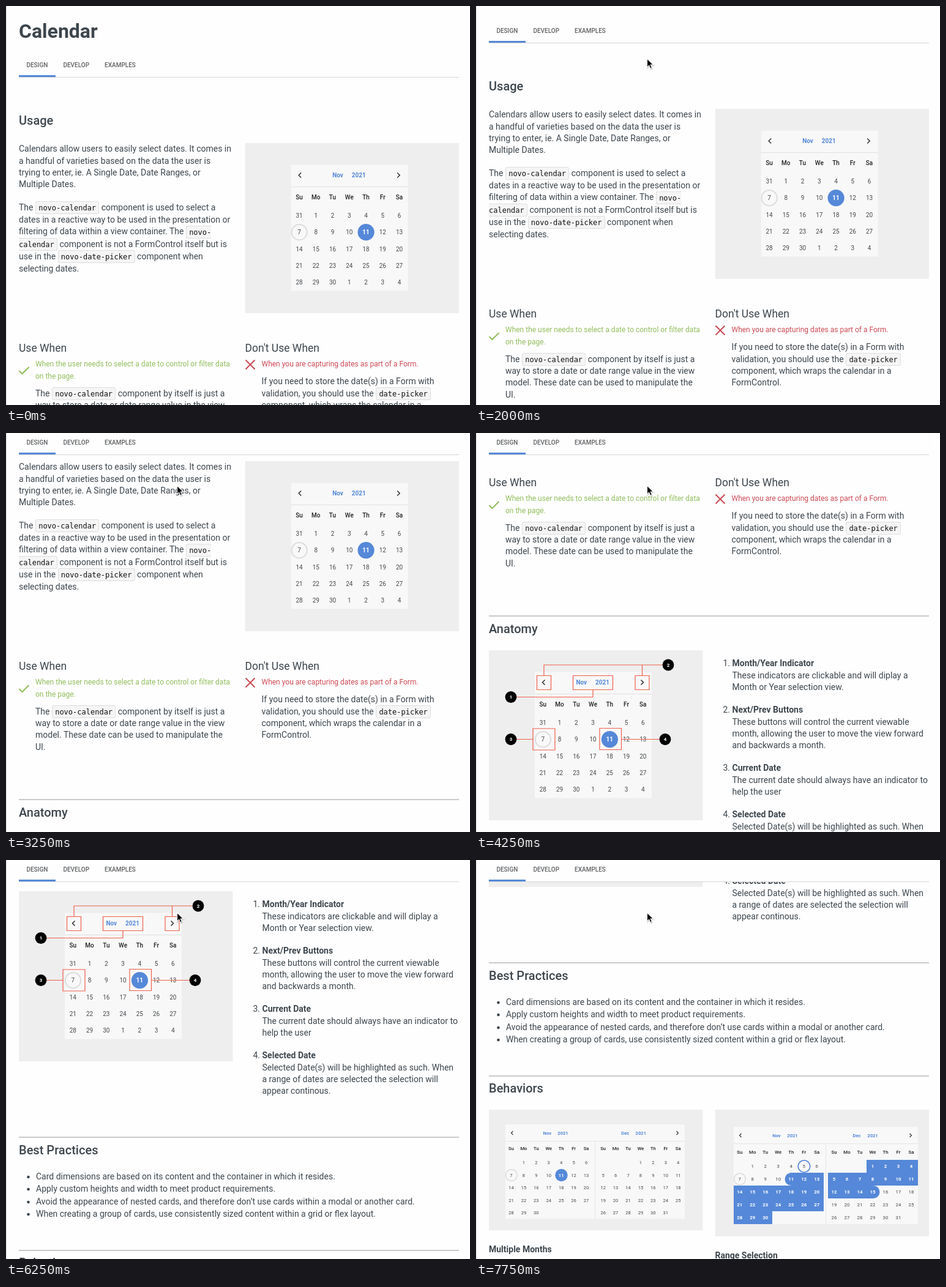
Recreate the animation shown at these times as an HTML page. Size 758x652 px, loop 8 s.

```html
<!DOCTYPE html>
<html lang="en">
<head>
<meta charset="utf-8">
<title>Calendar</title>
<style>
@property --s { syntax: "<number>"; inherits: true; initial-value: 0; }
:root { --ink: #3d464d; --blue: #5588d8; --green: #92bd5c; --red: #cc4a54; }
html, body { margin: 0; width: 100%; height: 100%; overflow: hidden; background: #fefefe; }
body { font: 14px/20px Roboto, Arial, sans-serif; color: var(--ink); }
#stage {
  position: absolute; left: 0; top: 0; width: 758px; height: 652px; overflow: hidden;
  animation: scroll 8s step-end infinite;
}
#page { position: absolute; inset: 0; transform: translateY(calc(var(--s) * -1px)); }
#tabs {
  position: absolute; left: 21px; top: 81px; width: 719px; height: 35px;
  background: #fefefe; border-bottom: 1px solid #d6d6d8;
  transform: translateY(max(-81px, var(--s) * -1px));
}
#tabs b { position: absolute; top: 6px; font: 500 10px/20px Roboto, sans-serif; color: #5f6164; }
#tabs i { position: absolute; left: 0; top: 32px; width: 60px; height: 3px; background: var(--blue); }
#edge { position: absolute; left: 0; top: 0; width: 1px; height: 652px; background: #d9d9d9; }
#page div { position: absolute; white-space: pre; }
#page .h1 { font-size: 32px; font-weight: 700; }
#page .h2 { font-size: 20px; font-weight: 500; }
#page .h3 { font-size: 17.5px; }
#page .b { font-weight: 700; }
#page .ok { font-size: 12px; color: var(--green); }
#page .no { font-size: 12px; color: var(--red); }
#page .n { width: 30px; text-align: right; }
#page .hr { left: 21px; width: 719px; height: 2px; background: #cacacb; }
code {
  font: 12px/0 "DejaVu Sans Mono", monospace; color: #111; padding: 2.5px 4.2px;
  background: #f5f5f5; border: 1px solid #dedede; border-radius: 3px;
}
code.l { border-right: 0; padding-right: 0; border-radius: 3px 0 0 3px; }
code.r { border-left: 0; padding-left: 0; border-radius: 0 3px 3px 0; }
svg { position: absolute; left: 0; top: 0; overflow: visible; }
svg text { font-family: Roboto, Arial, sans-serif; text-anchor: middle; }
#cursor { animation: show 8s step-end infinite; }
@keyframes show { 0% { opacity: 0; } 9.375% { opacity: .5; } 12.5%, 100% { opacity: 1; } }
@keyframes scroll {
  0% { --s: 0; }
  21.875% { --s: 14; }
  25% { --s: 56; }
  28.125% { --s: 92; }
  31.25% { --s: 114; }
  34.375% { --s: 126; }
  37.5% { --s: 140; }
  40.625% { --s: 178; }
  43.75% { --s: 262; }
  46.875% { --s: 348; }
  50% { --s: 422; }
  53.125% { --s: 478; }
  56.25% { --s: 560; }
  59.375% { --s: 638; }
  62.5% { --s: 684; }
  65.625% { --s: 700; }
  75% { --s: 718; }
  78.125% { --s: 782; }
  81.25% { --s: 846; }
  84.375% { --s: 892; }
  87.5% { --s: 918; }
  90.625% { --s: 956; }
  93.75% { --s: 1020; }
  96.875%, 100% { --s: 1067; }
}
</style>
</head>
<body>
<div id="stage">
  <div id="page"></div>
  <div id="tabs">
    <b style="left:12.4px">DESIGN</b><b style="left:72.4px">DEVELOP</b><b style="left:140px">EXAMPLES</b><i></i>
  </div>
  <div id="edge"></div>
  <svg id="cursor" width="758" height="652">
    <path d="M279.5 86v14.2l3.2-3.1 2.1 5 2.6-1.1-2.1-4.9h4.5z" transform="translate(.6 1.2)" fill="#0003" stroke="#0002" stroke-width="2"/>
    <path d="M279.5 86v14.2l3.2-3.1 2.1 5 2.6-1.1-2.1-4.9h4.5z" fill="#000" stroke="#fff" stroke-width="1.1"/>
  </svg>
</div>
<script>
const BLUE = '#5588d8', DARK = '#45484c', MARK = '#f0604c';
let html = '', art = '';

// HTML text; y is the middle of the first line
const line = (x, y, text, cls = '') =>
  html += `<div class="${cls}" style="left:${x}px;top:${y - 10}px">${text}</div>`;
const lines = (x, ys, texts, cls) => texts.forEach((t, i) => line(x, ys[i], t, cls));
const rule = y => html += `<div class="hr" style="top:${y}px"></div>`;
const code = (t, cls = '') => `<code class="${cls}">${t}</code>`;

// SVG helpers
const label = (x, y, t, size, fill = DARK, weight = 400) =>
  art += `<text x="${x}" y="${y + size * .355}" font-size="${size}" fill="${fill}" font-weight="${weight}">${t}</text>`;
const rect = (x, y, w, h, fill) => art += `<rect x="${x}" y="${y}" width="${w}" height="${h}" fill="${fill}"/>`;
const path = (d, stroke, width = 1) => art += `<path d="${d}" fill="none" stroke="${stroke}" stroke-width="${width}"/>`;
const disc = (x, y, r, fill, stroke = 'none', width = 2) =>
  art += `<circle cx="${x}" cy="${y}" r="${r}" fill="${fill}" stroke="${stroke}" stroke-width="${width}"/>`;
const chevron = (x, y, d, k) => path(`M${x + d * k / 2} ${y - k}l${-d * k} ${k}l${d * k} ${k}`, '#333', k * .38);

const span = (a, b) => Array.from({ length: b - a + 1 }, (_, i) => a + i);
const blanks = n => Array(n).fill('');

function month(x, y, step, size, cells, lit = []) {
  ['Su', 'Mo', 'Tu', 'We', 'Th', 'Fr', 'Sa'].forEach((d, i) => label(x + i * step, y, d, size, '#222', 500));
  const top = y + step * 1.12;
  cells.forEach((n, i) => {
    const on = lit.includes(i);
    label(x + i % 7 * step, top + Math.floor(i / 7) * step, n, size, on ? '#fff' : DARK, on ? 700 : 400);
  });
}

function single(x, y) {
  rect(x, y, 349.5, 278, '#eeeeee');
  rect(x + 75, y + 35.5, 191, 206, '#f8f8f8');
  rect(x + 75, y + 71, 191, 1, '#e0e0e0');
  chevron(x + 89.5, y + 52.5, 1, 4);
  chevron(x + 250.5, y + 52.5, -1, 4);
  label(x + 151.3, y + 52.5, 'Nov', 10, BLUE, 700);
  label(x + 185.5, y + 52.5, '2021', 10, BLUE, 700);
  disc(x + 88.5, y + 145.7, 12.6, 'none', '#dcdcdc');
  disc(x + 197.4, y + 145.7, 13.6, BLUE);
  month(x + 88.3, y + 88, 27.25, 10, [31, ...span(1, 30), ...span(1, 4)], [11]);
}

function double(x, y, w, h, box, heads, divider) {
  const [bx, by, bw, bh] = box;
  rect(x, y, w, h, '#eeeeee');
  rect(bx, by, bw, bh, '#f8f8f8');
  rect(bx, by + 27.3, bw, .8, '#e0e0e0');
  rect(divider, by + 27.3, .8, bh - 27.3, '#e0e0e0');
  chevron(bx + 11, by + 14, 1, 3);
  chevron(bx + bw - 12, by + 14, -1, 3);
  ['Nov', '2021', 'Dec', '2021'].forEach((t, i) => label(heads[i], by + 14, t, 7.6, BLUE, 700));
}

// Usage
line(21, 41, 'Calendar', 'h1');
line(21, 187, 'Usage', 'h2');
lines(21, [233, 253, 272, 291, 328.5, 349, 368, 388.5, 408.5, 429], [
  'Calendars allow users to easily select dates. It comes in',
  'a handful of varieties based on the data the user is',
  'trying to enter, ie. A Single Date, Date Ranges, or',
  'Multiple Dates.',
  `The ${code('novo-calendar')} component is used to select a`,
  'dates in a reactive way to be used in the presentation or',
  `filtering of data within a view container. The ${code('novo-', 'l')}`,
  `${code('calendar', 'r')} component is not a FormControl itself but is`,
  `use in the ${code('novo-date-picker')} component when`,
  'selecting dates.'
]);
single(390.7, 224);

line(21, 559, 'Use When', 'h3');
lines(48, [585, 605], ['When the user needs to select a date to control or filter data', 'on the page.'], 'ok');
lines(48, [632.5, 652, 671, 691], [
  `The ${code('novo-calendar')} component by itself is just a`,
  'way to store a date or date range value in the view',
  'model. These date can be used to manipulate the',
  'UI.'
]);
path('M21.5 596l5 5L37.5 590', '#92bd5c', 2);
line(390.5, 559, "Don't Use When", 'h3');
line(417.5, 585, 'When you are capturing dates as part of a Form.', 'no');
lines(417.5, [613, 632.5, 652, 671], [
  'If you need to store the date(s) in a Form with',
  `validation, you should use the ${code('date-picker')}`,
  'component, which wraps the calendar in a',
  'FormControl.'
]);
path('M391.5 578.5l15 15m0-15l-15 15', '#cc4a54', 2);

// Anatomy
rule(776);
line(21, 798, 'Anatomy', 'h2');
single(21, 833);
path('M99.5 874.5h23v23h-23zM260 874.5h23v23h-23zM158.5 874.5h65v23h-65z' +
  'M111 874.5v-17.5h194M271.5 874.5v-17.5M66 909.5h125v-12' +
  'M93 961h36v35h-36zM66 978.5h27M202 960.5h35.5v35h-35.5zM237.5 978.5h63', MARK, 1.2);
[[57, 909.5], [314, 857], [57, 978.5], [309, 978.5]].forEach(([x, y], i) => {
  disc(x, y, 9.4, '#000');
  label(x, y, i + 1, 8, '#fff', 700);
});

const parts = [
  [854, 'Month/Year Indicator', 'These indicators are clickable and will diplay a', 'Month or Year selection view.'],
  [930, 'Next/Prev Buttons', 'These buttons will control the current viewable', 'month, allowing the user to move the view forward', 'and backwards a month.'],
  [1025, 'Current Date', 'The current date should always have an indicator to', 'help the user'],
  [1101, 'Selected Date', 'Selected Date(s) will be highlighted as such. When', 'a range of dates are selected the selection will', 'appear continous.']
];
parts.forEach(([y, title, ...body], i) => {
  line(385, y, i + 1 + '.', 'n');
  line(418.5, y, title, 'b');
  lines(418.5, [y + 19.5, y + 39, y + 58], body);
});

// Best practices
rule(1234);
line(21, 1256, 'Best Practices', 'h2');
[
  'Card dimensions are based on its content and the container in which it resides.',
  'Apply custom heights and width to meet product requirements.',
  'Avoid the appearance of nested cards, and therefore don’t use cards within a modal or another card.',
  'When creating a group of cards, use consistently sized content within a grid or flex layout.'
].forEach((t, i) => {
  const y = Math.round(1299 + i * 20.3);
  line(49, y, t);
  disc(36.5, y + 1, 2.3, '#3d464d');
});

// Behaviors
rule(1419);
line(21, 1440, 'Behaviors', 'h2');
const nov = [...blanks(1), ...span(1, 30)], dec = [...blanks(3), ...span(1, 31)];

double(21, 1475, 349.5, 197, [48, 1499, 293, 154.5], [116.3, 142, 243.7, 269.3], 194.3);
disc(58, 1582, 9.4, 'none', '#dcdcdc', 1.5);
disc(139.5, 1582, 10.2, BLUE);
month(57.5, 1538.7, 20.42, 7.6, nov, [11]);
month(207.7, 1538.7, 20.42, 7.6, dec);

double(390.7, 1475, 349.5, 207, [421, 1503, 301, 159], [491, 517, 622, 648], 571);
art += `<path fill="${BLUE}" d="M568 1578h-53a10.5 10.5 0 0 0 0 21h-94v63h63v-21h84z` +
  `M638 1557h84v42h-73a10.5 10.5 0 0 1 0 21h-74v-42h63z"/>`;
disc(536, 1567.5, 9.8, 'none', BLUE, 1.6);
disc(431, 1588.5, 9.4, 'none', '#dcdcdc', 1.5);
month(430.7, 1544, 21, 7.8, nov, span(11, 30));
month(585, 1544, 21, 7.8, dec, span(3, 17));

line(21, 1703, 'Multiple Months', 'b');
line(390.5, 1713, 'Range Selection', 'b');

document.getElementById('page').innerHTML = `<svg width="758" height="1800">${art}</svg>` + html;
</script>
</body>
</html>
```
